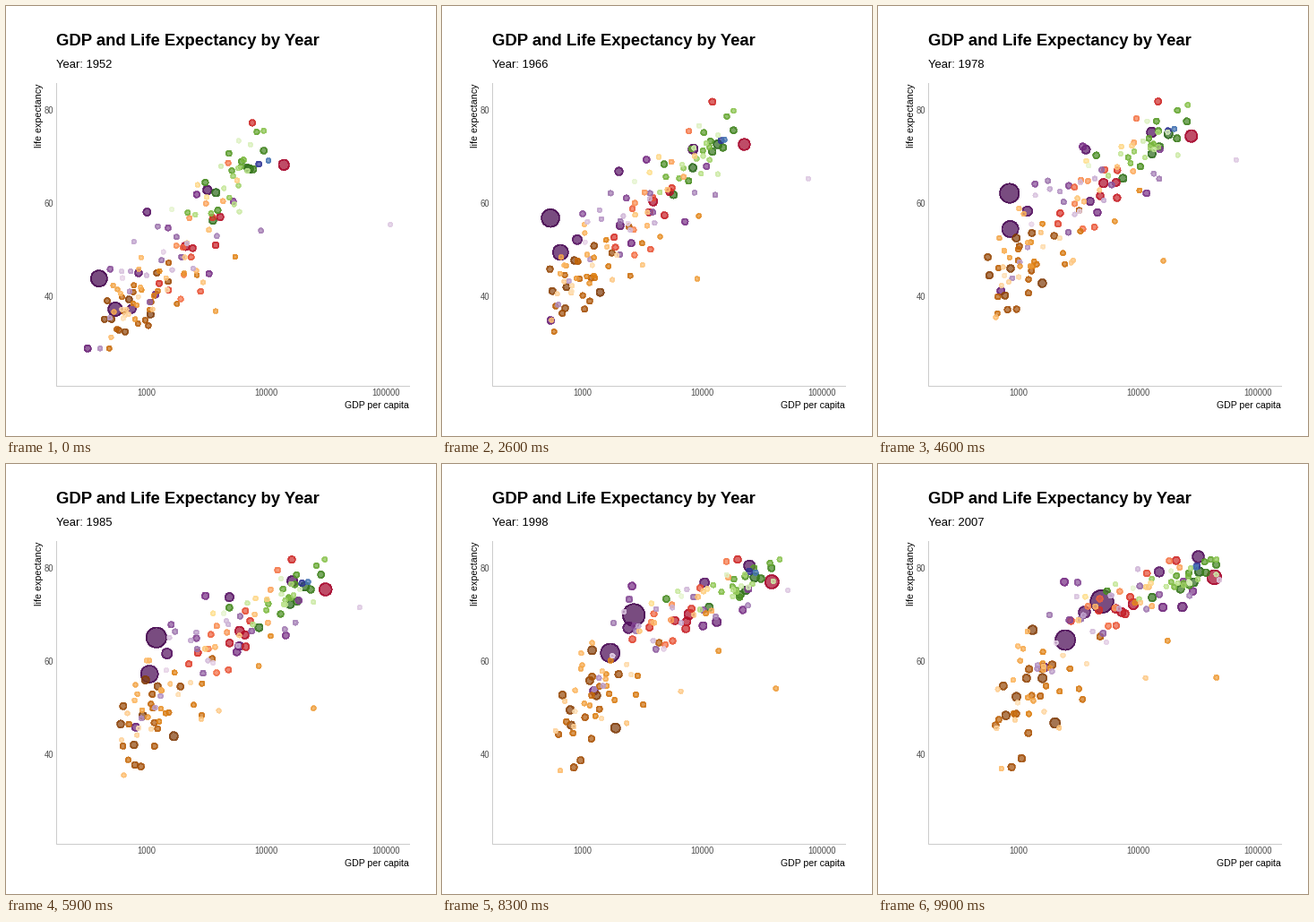
A matplotlib script for the animation above (10 s loop, 480 by 480 pixels).

```python
import numpy as np
import matplotlib.pyplot as plt
from matplotlib.animation import FuncAnimation

plt.rcParams["font.family"] = "Liberation Sans"

SIZE, DPI = 480, 72
FRAMES, INTERVAL = 100, 100
FIRST, LAST, SURVEYS = 1952, 2007, 12
MAX_POP = 1319
GREY = "#4d4d4d"

# Landmark countries: GDP per capita (first, last), life expectancy
# (first, last) and the first population in millions.
LANDMARKS = {
    "Africa": [(1077, 2014, 36.3, 46.9, 33)],            # Nigeria
    "Americas": [(13990, 42952, 68.4, 78.2, 158),        # United States
                 (2109, 9066, 50.9, 72.4, 57)],          # Brazil
    "Asia": [(400, 4959, 44, 73, 556),                   # China
             (547, 2452, 37.4, 64.7, 372),               # India
             (3217, 31656, 63, 82.6, 86),                # Japan
             (750, 3541, 37.5, 70.7, 82),                # Indonesia
             (108382, 47307, 55.6, 77.6, 0.16)],         # Kuwait
    "Europe": [(7144, 32170, 67.5, 79.4, 69)],           # Germany
}

# The other countries, as a cloud per continent: pairs are first and last year.
CLOUDS = {
    "Africa": dict(n=51, lg=(2.98, 3.22), spread=0.36, skew=0.5,
                   life=(39.5, 55), life_sd=(5, 8.5), pop=(22, 0.06), growth=4),
    "Americas": dict(n=23, lg=(3.45, 3.87), spread=0.25, skew=0.1,
                     life=(54, 73.5), life_sd=(8, 3.8), pop=(30, 0.66)),
    "Asia": dict(n=28, lg=(3.10, 3.75), spread=0.42, skew=0.2,
                 life=(47, 70.5), life_sd=(8, 6), pop=(45, 0.12)),
    "Europe": dict(n=29, lg=(3.70, 4.34), spread=0.23, skew=-0.3,
                   life=(65.5, 77.8), life_sd=(5, 2.6), pop=(50, 0.15),
                   growth=1.35),
    "Oceania": dict(n=2, lg=(4.01, 4.47), spread=0.05, skew=0,
                    life=(69.2, 80.7), life_sd=(0.2, 0.5), pop=(8.7, 2)),
}

# Colormap and the stretch of it running from large to small countries.
SHADES = {
    "Africa": ("PuOr", 0, 0.4),
    "Americas": ("RdYlBu", 0, 0.4),
    "Asia": ("PRGn", 0, 0.4),
    "Europe": ("PiYG", 1, 0.6),
    "Oceania": ("RdYlBu", 1, 0.9),
}

rng = np.random.default_rng(1952)
T = np.linspace(0, 1, SURVEYS)[:, None]


def ease(first, last, power):
    return first + (last - first) * T ** power


def scores(n):
    """Shuffled, evenly spread values with unit deviation."""
    z = np.arctanh(np.linspace(-0.93, 0.93, n))
    return rng.permutation(z / z.std())


def drift(n):
    """Scores that wander from one ranking towards another."""
    return scores(n) * np.cos(0.8 * T) + scores(n) * np.sin(0.8 * T)


def skewed(z, k):
    if not k:
        return z
    w = np.expm1(k * z) / k
    return (w - w.mean()) / w.std()


def cloud(n, lg, spread, skew, life, life_sd, pop, growth=2.5):
    wealth = drift(n)
    health = 0.65 * wealth + 0.76 * drift(n)
    x = ease(*lg, 0.7) + spread * (0.75 + 0.25 * T) * skewed(wealth, skew)
    y = ease(*life, 0.7) + ease(*life_sd, 1) * health
    x += rng.normal(0, 0.02, x.shape)
    y += rng.normal(0, 0.25, y.shape)
    p = np.geomspace(*pop, n) * growth ** T
    return np.clip(x, 2.43, 4.65), np.clip(y, 29, 82), p


def landmark(gdp0, gdp1, life0, life1, pop, growth):
    # Poor countries take off late, richer ones early.
    power = 1.6 if gdp0 < 1000 else 0.65
    return (ease(np.log10(gdp0), np.log10(gdp1), power),
            ease(life0, life1, 0.6), pop * growth ** T)


def continent(name):
    growth = CLOUDS[name].get("growth", 2.5)
    tracks = [landmark(*row, growth) for row in LANDMARKS.get(name, [])]
    tracks.append(cloud(**CLOUDS[name]))
    x, y, pop = (np.hstack(part) for part in zip(*tracks))
    rank = np.argsort(np.argsort(-pop[0])) / (pop.shape[1] - 1)
    cmap, big, small = SHADES[name]
    return x, y, pop, plt.get_cmap(cmap)(big + (small - big) * rank)


def px(lg):
    return 157 + 133.7 * (lg - 3)


def py(life):
    return 325 - 5.2 * (life - 40)


def area(pop):
    mm = 2 + 10 * np.sqrt(np.minimum(pop / MAX_POP, 1))
    return (0.75 * (2.845 * mm + 0.94) - 0.8) ** 2


parts = [continent(name) for name in CLOUDS]
lg, life, pops = (np.hstack([p[k] for p in parts]) for k in range(3))
order = np.argsort(-pops[0])
X, Y, S = (a[:, order] for a in (px(lg), py(life), area(pops)))
colors = np.vstack([p[3] for p in parts])[order]

fig = plt.figure(figsize=(SIZE / DPI, SIZE / DPI), dpi=DPI, facecolor="white")
ax = fig.add_axes([0, 0, 1, 1])
ax.set(xlim=(0, SIZE), ylim=(SIZE, 0))
ax.axis("off")

ax.plot([56.2, 56.2, 450], [86, 423.8, 423.8], color="#cccccc", lw=1)
ax.text(56, 44, "GDP and Life Expectancy by Year", size=18.55, weight="bold")
subtitle = ax.text(56, 69, "", size=13)
ax.text(450, 449, "GDP per capita", size=10.5, ha="right")
ax.text(42, 87, "life expectancy", size=10.6, rotation=90, ha="right", va="top")
for exp in (3, 4, 5):
    ax.text(px(exp), 435, str(10 ** exp), size=9.5, color=GREY, ha="center")
for tick in (40, 60, 80):
    ax.text(53, py(tick) + 3.2, str(tick), size=9.5, color=GREY, ha="right")

dots = ax.scatter(X[0], Y[0], s=S[0], c=colors, alpha=0.7, edgecolors="face",
                  linewidths=0.8, antialiased=False, zorder=3)


def update(i):
    # Straight moves between surveys five years apart.
    k, f = divmod(i / (FRAMES - 1) * (SURVEYS - 1), 1)
    k = int(k)
    nxt = min(k + 1, SURVEYS - 1)
    x, y, s = (a[k] + f * (a[nxt] - a[k]) for a in (X, Y, S))
    dots.set_offsets(np.column_stack([x, y]))
    dots.set_sizes(s)
    year = round(FIRST + (LAST - FIRST) * i / (FRAMES - 1))
    subtitle.set_text(f"Year: {year}")
    return dots, subtitle


anim = FuncAnimation(fig, update, frames=FRAMES, interval=INTERVAL,
                     repeat=True, repeat_delay=0, blit=False)
plt.show()
```
